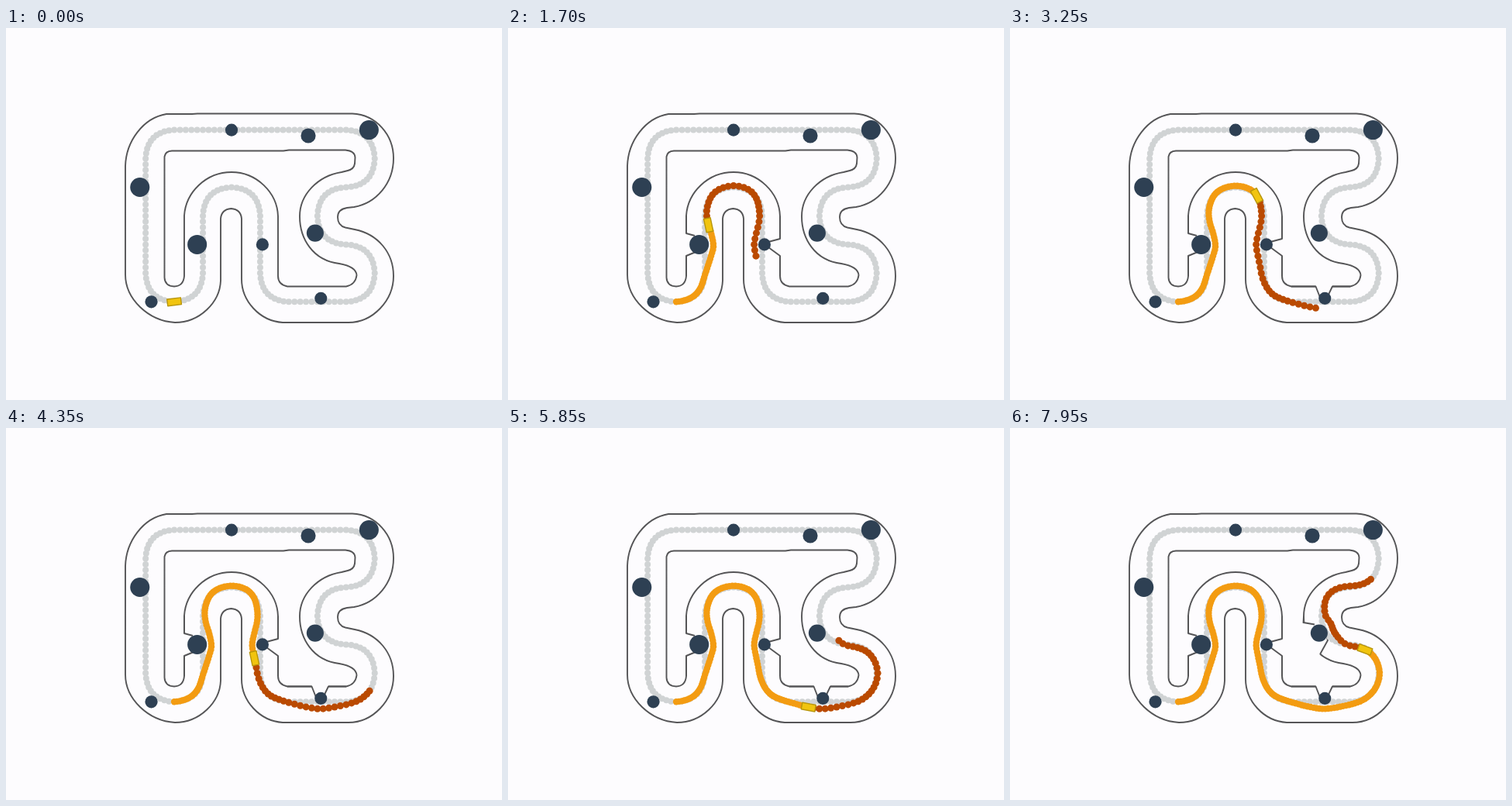
An HTML page with a canvas for the animation above (8000 ms loop, 640 by 480 pixels).

```html
<!DOCTYPE html>
<html lang="en">
<head>
<meta charset="utf-8">
<title>Race track path planning</title>
<style>
html, body { margin: 0; width: 100%; height: 100%; overflow: hidden; background: #fdfcfe; }
canvas { display: block; width: 640px; height: 480px; }
</style>
</head>
<body>
<canvas id="stage" width="640" height="480"></canvas>
<script>
const ctx = document.getElementById('stage').getContext('2d');
const LOOP = 8000, STEP = 50, HORIZON = 29, SCALE = 147.8;
const COLORS = {
  back: '#fdfcfe', wall: '#555557', waypoint: '#d0d3d4', driven: '#f39c12',
  plan: '#ba4a00', obstacle: '#2e4053', car: '#f1c40f', carEdge: '#b7950b'
};
const sx = x => 291 + SCALE * x;
const sy = y => 131.6 - SCALE * y;

// Track corners in metres, joined by straight legs of 0.05 m steps
const corners = [
  [-0.75, -1.5], [-0.25, -1.5], [-0.25, -0.5], [0.25, -0.5], [0.25, -1.5],
  [1.25, -1.5], [1.25, -1], [0.75, -1], [0.75, -0.5], [1.25, -0.5],
  [1.25, 0], [-0.75, 0]
];
const raw = [];
corners.forEach(([x, y], i) => {
  const [nx, ny] = corners[(i + 1) % corners.length];
  const n = Math.round(Math.hypot(nx - x, ny - y) / 0.05);
  for (let j = 0; j < n; j++) raw.push([x + (nx - x) * j / n, y + (ny - y) * j / n]);
});
const count = raw.length;
const wrap = i => (i % count + count) % count;

// A moving average rounds the corners
const waypoints = raw.map((_, i) => {
  let x = 0, y = 0;
  for (let j = -5; j <= 5; j++) {
    const p = raw[wrap(i + j)];
    x += p[0] / 11;
    y += p[1] / 11;
  }
  return [sx(x), sy(y)];
});

// [waypoint index, sideways offset in px, left of travel positive]
const offsets = [
  [5, 0], [10, 0.8], [13, 1], [14.5, 0], [16.3, -4], [18, -8], [19.7, -11],
  [22, -8], [23.7, -4], [25.6, -2], [28, -1], [31, 1], [35, 2], [38, 1.5],
  [40, 0], [43, -2.5], [46, -4], [48, -7.5], [50, -10.3], [52, -8], [54, -5],
  [57, -1.5], [60, 0.3], [63, 1], [65, -1], [67, -5], [70, -9], [72, -8],
  [74, -5.2], [76, -2.3], [80, 0], [85, -1.3], [90, 1], [95, 1.5], [98, -6],
  [100, -9], [103, -10.5], [105, -5.5], [107, -2], [110, 1], [115, 1.5], [120, 0.3], [125, 0]
];
// [time in ms, waypoint index]
const progress = [
  [0, 5], [1700, 23.4], [3250, 40.2], [4350, 52.4], [5100, 60.4], [6600, 75.8], [8000, 92.2]
];

function findLeg(keys, v) {
  let i = 0;
  while (i < keys.length - 2 && v > keys[i + 1][0]) i++;
  return i;
}

function linear(keys, v) {
  const i = findLeg(keys, v), [a, p] = keys[i], [b, q] = keys[i + 1];
  return p + (q - p) * (v - a) / (b - a);
}

function smooth(keys, v) {
  const slope = j => {
    const a = keys[Math.max(0, j - 1)], b = keys[Math.min(keys.length - 1, j + 1)];
    return (b[1] - a[1]) / (b[0] - a[0]);
  };
  const i = findLeg(keys, v), [a, p] = keys[i], [b, q] = keys[i + 1];
  const h = b - a, u = (v - a) / h, w = 1 - u;
  return p * w * w * (1 + 2 * u) + q * u * u * (3 - 2 * u)
    + h * u * w * (w * slope(i) - u * slope(i + 1));
}

function center(k) {
  const i = Math.floor(k), u = k - i;
  const a = waypoints[wrap(i)], b = waypoints[wrap(i + 1)];
  return [a[0] + (b[0] - a[0]) * u, a[1] + (b[1] - a[1]) * u];
}

function pose(k) {
  const [x, y] = center(k), a = center(k - 1), b = center(k + 1);
  const dx = b[0] - a[0], dy = b[1] - a[1];
  const e = smooth(offsets, k) / Math.hypot(dx, dy);
  return [x + dy * e, y - dx * e];
}

const walls = [
  'M154 178C155 146 177 116 207 111L240 111L247 110.5L447 110.5C478 112 500 138 500 168' +
  'C500 200 478 226 449 231L440 232Q428 234 428 244Q428 255 438 257.5L450 260' +
  'C480 266 500 290 500 320C500 352 473 380 442 380L357 380C327 378 304 352 304 324' +
  'L304 246Q303 234 290.5 233Q278 234 277 246L277 326C276 354 250 380 218 380' +
  'C184 378 154 350 154 318Z',
  'M204.5 166Q205.5 159 214 158.5L358 158.5L365 157.5L438 157.5Q450 158.5 450.5 167' +
  'L450 175Q449 182 441 184L433 186C402 191 379 215 379 243C379 272 396 300 430 304' +
  'Q452 308 452.5 319Q451 331 439 333.5L363 333.5Q351 331 351 320L351 243' +
  'C350 212 323 186 291 186C258 186 232 212 230 242L230 320Q229 333 217 333.5' +
  'Q205 333 204.5 322Z'
].map(d => new Path2D(d));

// Wall dents around obstacles, shown once the car has reached index `from`
const dents = [
  { from: 5.1, gap: 'M230 265L230 294', edge: 'M230 242L230 265L241 268M241 289.5L230 294L230 320' },
  { from: 19.5, gap: 'M351 272L351 294', edge: 'M351 243L351 272L334 276.5M334 281.5L351 294L351 320' },
  { from: 39, gap: 'M394.5 333.5L416 333.5', edge: 'M363 333.5L394.5 333.5L401 350M408.5 349L416 333.5L439 333.5' },
  { from: 70, gap: 'M379.3 251C382 268 389 282 400 292', edge: 'M379 243L378.5 251L393 253.5M406 262L410 274L400 292' }
].map(d => ({ from: d.from, gap: new Path2D(d.gap), edge: new Path2D(d.edge) }));

const obstacles = [
  [0, 0, 0.05], [-0.8, -0.5, 0.08], [-0.7, -1.5, 0.05], [-0.3, -1, 0.08], [0.27, -1, 0.05],
  [0.78, -1.47, 0.05], [0.73, -0.9, 0.07], [1.2, 0, 0.08], [0.67, -0.05, 0.06]
];

function dot([x, y], r, color) {
  ctx.fillStyle = color;
  ctx.beginPath();
  ctx.arc(x, y, r, 0, Math.PI * 2);
  ctx.fill();
}

function line(path, color, width) {
  ctx.strokeStyle = color;
  ctx.lineWidth = width;
  ctx.stroke(path);
}

function drawCar(k) {
  const [x, y] = pose(k), [nx, ny] = pose(k + 1);
  ctx.save();
  ctx.translate(x, y);
  ctx.rotate(Math.atan2(ny - y, nx - x));
  ctx.fillStyle = COLORS.car;
  ctx.strokeStyle = COLORS.carEdge;
  ctx.lineWidth = 1.4;
  ctx.beginPath();
  ctx.rect(-8.9, -4.4, 17.8, 8.8);
  ctx.fill();
  ctx.stroke();
  ctx.restore();
}

function draw(t) {
  const k = linear(progress, t);
  ctx.fillStyle = COLORS.back;
  ctx.fillRect(0, 0, 640, 480);
  ctx.lineJoin = 'round';

  walls.forEach(w => line(w, COLORS.wall, 1.9));
  const shown = dents.filter(d => k >= d.from);
  shown.forEach(d => line(d.gap, COLORS.back, 5));
  shown.forEach(d => line(d.edge, COLORS.wall, 1.9));

  waypoints.forEach(p => dot(p, 4, COLORS.waypoint));
  obstacles.forEach(([x, y, r]) => dot([sx(x), sy(y)], r * SCALE + 0.7, COLORS.obstacle));

  if (t > 0) {
    for (let u = 0; u <= t; u += STEP) dot(pose(linear(progress, u)), 4.2, COLORS.driven);
    for (let i = 1; i <= HORIZON; i++) dot(pose(Math.floor(k) + i), 4.5, COLORS.plan);
  }
  drawCar(k);
}

const start = performance.now();
function tick() {
  const t = (performance.now() - start) % LOOP;
  draw(Math.floor(t / STEP) * STEP);
  requestAnimationFrame(tick);
}
tick();
</script>
</body>
</html>
```
